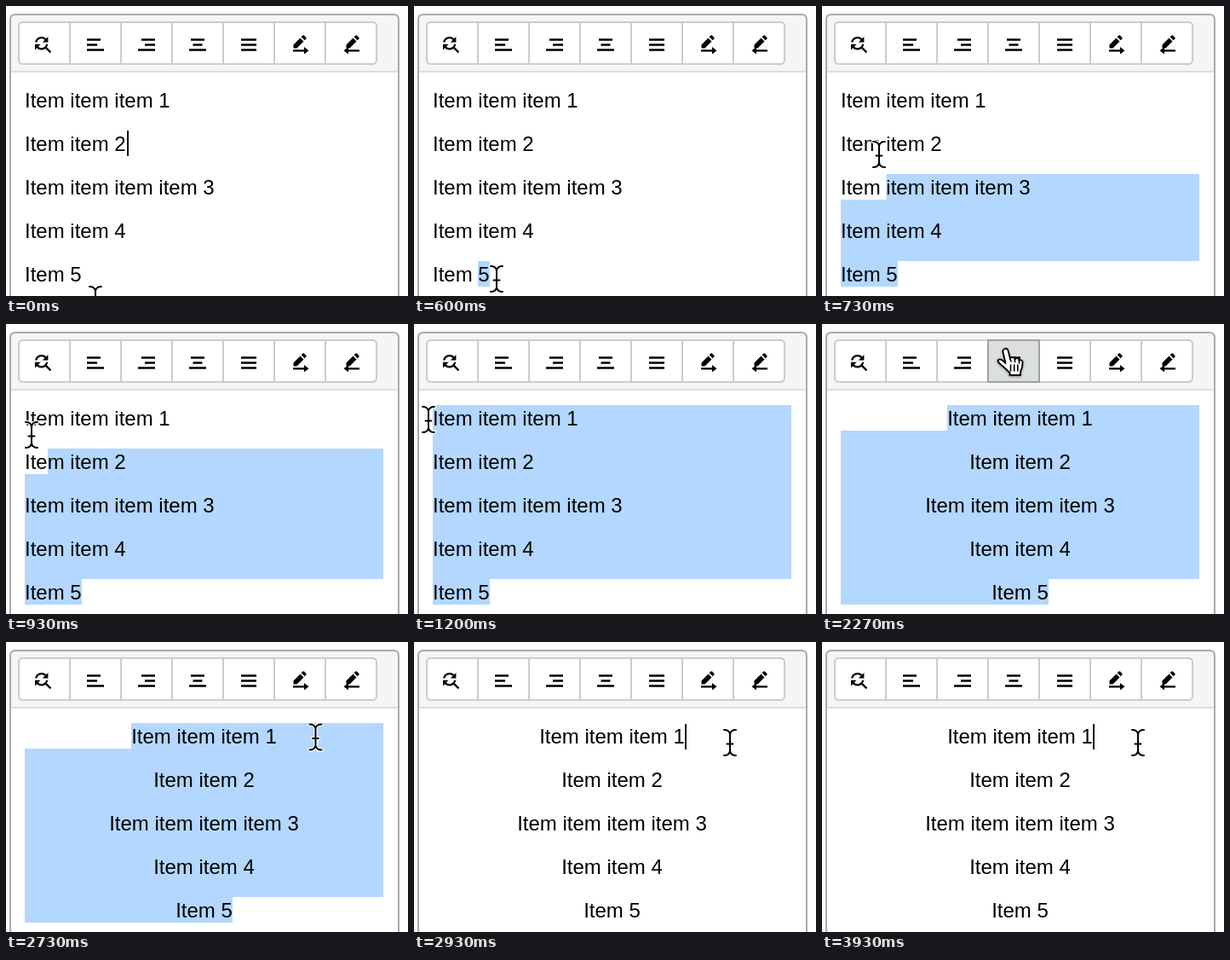
An HTML page for the animation above (4070 ms loop, 472 by 340 pixels).

```html
<!DOCTYPE html>
<html lang="en">
<head>
<meta charset="utf-8">
<title>Editor alignment</title>
<style>
  html, body { margin: 0; width: 100%; height: 100%; overflow: hidden; background: #fff; }
  svg { display: block; width: 472px; height: 340px; }
  .lines { font: 24px "Liberation Sans", Arial, Helvetica, sans-serif; }
  .button { fill: #fff; stroke: #ccc; stroke-width: 2; }
  .button.hover { fill: #e6e8e8; stroke: #adadad; }
  .button.press { fill: #dcdfdf; stroke: #a0a0a0; }
  .bars { stroke: #000; stroke-width: 2.7; fill: none; }
  .hand { filter: drop-shadow(0 1px 1.5px rgba(0, 0, 0, .4)); }
</style>
</head>
<body>
<svg viewBox="0 0 472 340">
  <defs>
    <clipPath id="group"><rect x="14" y="18" width="422" height="51" rx="6"/></clipPath>
    <path id="pencil" d="M-7.5 4.5V.5L.5 -7.5L4.500 -3.500L-3.500 4.500ZM1.700 -8.700L3.400 -10.400Q4.200 -11 5 -10.400L7.400 -8Q8 -7.200 7.400 -6.400L5.700 -4.700Z"/>
    <path id="beam" d="M-7 -15Q-1 -15 0 -10Q1 -15 7 -15M0 -10V10M-7 15Q-1 15 0 10Q1 15 7 15M-3.500 1.500H3.500"/>
  </defs>

  <rect width="472" height="340" fill="#fff"/>
  <path d="M5 77V16Q5 10 11 10H455Q461 10 461 16V77Z" fill="#f5f5f5"/>
  <path d="M5 77H461" stroke="#ddd" stroke-width="2"/>
  <path d="M5 342V16Q5 10 11 10H455Q461 10 461 16V342" fill="none" stroke="#ababab" stroke-width="2"/>

  <g id="buttons" clip-path="url(#group)"></g>
  <rect x="15" y="19" width="420" height="49" rx="5" fill="none" stroke="#ccc" stroke-width="2"/>
  <g id="active" clip-path="url(#group)"></g>

  <path transform="translate(29.600 31.600) scale(1.100)" d="M11 6c1.380 0 2.630.56 3.540 1.460L12 10h6V4l-2.050 2.050C14.680 4.780 12.930 4 11 4c-3.530 0-6.430 2.610-6.920 6H6.100c.46-2.280 2.480-4 4.900-4zm5.640 9.140c.66-.9 1.120-1.970 1.280-3.140H15.900c-.46 2.280-2.480 4-4.900 4-1.380 0-2.630-.56-3.540-1.460L10 12H4v6l2.050-2.050C7.320 17.220 9.070 18 11 18c1.550 0 2.980-.51 4.140-1.360L20 21.490 21.490 20z"/>
  <g class="bars">
    <path d="M95 39.500H111M95 45.500H107M95 51.500H115"/>
    <path d="M159 39.500H175M163 45.500H175M155 51.500H175"/>
    <path d="M217 39.500H233M219.500 45.500H230.500M215 51.500H235"/>
    <path d="M276 39.500H294M276 45.500H294M276 51.500H294"/>
  </g>
  <use href="#pencil" x="345" y="45"/>
  <path d="M337 51.200H350V48L355.500 52.300L350 56.600V53.500H337Z"/>
  <use href="#pencil" x="407" y="45"/>
  <path d="M415 51.200H402V48L396.500 52.300L402 56.600V53.500H415Z"/>

  <path id="selection" fill="#b3d7ff"/>
  <g id="lines" class="lines"></g>
  <rect id="caret" width="2" height="30"/>

  <g id="pointer">
    <g id="ibeam" fill="none" stroke-linecap="round">
      <use href="#beam" stroke="#fff" stroke-width="4.500"/>
      <use href="#beam" stroke="#000" stroke-width="2"/>
    </g>
    <g id="hand" class="hand" stroke="#000" stroke-linecap="round" stroke-linejoin="round">
      <path fill="#fff" stroke-width="1.800" d="M-4.500 4C-5.500 0 0 -2 1.500 2L4 12C5 9 9 9 9.500 12.500C11 10 14.500 11 14.500 14C16.500 12 19 14 18.500 17C18.500 21 17.500 24 16 27V31H3.500V28C0 25 -3 21.500 -6 19.500C-9 17 -11.500 15 -10 13C-8 11 -4 14 -1.500 17Z"/>
      <path fill="none" stroke-width="1.600" d="M4.500 19V26M8.700 19V26M12.800 19V26M4 12L5 15M9.500 12.500V15.500M14.500 14V17"/>
    </g>
  </g>
</svg>
<script>
const LOOP = 4070, TICK = 200 / 3;
const LEFT = 22, RIGHT = 443, TOP = 95, PITCH = 51, ROW = 30;
const $ = id => document.getElementById(id);

// time, x, y of the pointer's hot spot
const path = [
  [0, 105, 344], [70, 105, 344], [330, 97, 320], [600, 97, 320], [730, 67, 174],
  [800, 52, 150], [930, 30, 130], [1070, 18, 118], [1200, 17, 112], [1530, 17, 112],
  [1670, 55, 92], [1800, 150, 52], [1870, 207, 33], [1930, 213, 31], [2070, 217, 29],
  [2330, 217, 29], [2470, 258, 60], [2670, 357, 106], [2800, 371, 118]
];
// time, row, x of the moving end of the selection
const drag = [
  [600, 4, 75], [670, 3, 75], [730, 2, 75.4], [800, 1, 75.4], [930, 1, 49],
  [1070, 0, 179], [1130, 0, 75.4], [1200, 0, LEFT]
];

function add(parent, tag, attrs) {
  const el = document.createElementNS("http://www.w3.org/2000/svg", tag);
  for (const name in attrs) el.setAttribute(name, attrs[name]);
  return parent.appendChild(el);
}

const buttonBox = i => ({ x: 15 + 60 * i, y: 19, width: 60, height: 49, class: "button" });
for (let i = 0; i < 7; i++) add($("buttons"), "rect", buttonBox(i));
const active = add($("active"), "rect", buttonBox(0));

const lines = ["Item item item 1", "Item item 2", "Item item item item 3", "Item item 4", "Item 5"]
  .map((text, i) => {
    const el = add($("lines"), "text", { y: 119 + PITCH * i });
    el.textContent = text;
    return el;
  });

function pointerAt(t) {
  const i = path.findIndex(key => key[0] > t);
  if (i < 0) return path[path.length - 1].slice(1);
  const [t0, x0, y0] = path[i - 1], [t1, x1, y1] = path[i];
  const u = (t - t0) / (t1 - t0);
  return [x0 + (x1 - x0) * u, y0 + (y1 - y0) * u];
}

function selectionShape(t, centred) {
  if (t < drag[0][0] || t >= 2870) return "";
  let [, row, x] = drag.filter(key => key[0] <= t).pop();
  if (centred) x = 147;
  const end = centred ? 266 : 89;
  const top = TOP + PITCH * row, last = TOP + PITCH * 4;
  if (row === 4) return `M${x} ${top}H${end}V${top + ROW}H${x}Z`;
  return `M${x} ${top}H${RIGHT}V${last}H${end}V${last + ROW}H${LEFT}V${top + ROW}H${x}Z`;
}

function placeCaret(t) {
  const first = t < 330;
  const shown = first || (t >= 2870 && t < 3470) || t >= 3930;
  $("caret").setAttribute("x", first ? 142 : 318);
  $("caret").setAttribute("y", first ? 146 : 96);
  $("caret").style.display = shown ? "" : "none";
}

function draw(now) {
  const t = Math.round(Math.floor((now % LOOP + 3.5) / TICK) * TICK / 10) * 10;
  const centred = t >= 2270;

  for (const line of lines) {
    line.setAttribute("x", centred ? (LEFT + RIGHT) / 2 : LEFT);
    line.setAttribute("text-anchor", centred ? "middle" : "start");
  }
  $("selection").setAttribute("d", selectionShape(t, centred));
  placeCaret(t);

  const [x, y] = pointerAt(t);
  const onBar = y < 69;
  $("pointer").setAttribute("transform", `translate(${x} ${y})`);
  $("hand").style.display = onBar ? "" : "none";
  $("ibeam").style.display = onBar ? "none" : "";

  // button highlight trails the pointer by one tick
  const [hx, hy] = pointerAt(Math.max(0, t - 70));
  active.style.display = hy < 69 ? "" : "none";
  active.setAttribute("x", 15 + 60 * Math.floor((hx - 15) / 60));
  active.setAttribute("class", t >= 2200 && t < 2330 ? "button press" : "button hover");
  // icons stay above the highlight
  requestAnimationFrame(tick);
}

let start;
function tick(now) {
  start ??= now;
  draw(Math.max(0, now - start));
}
draw(0);
</script>
</body>
</html>
```
